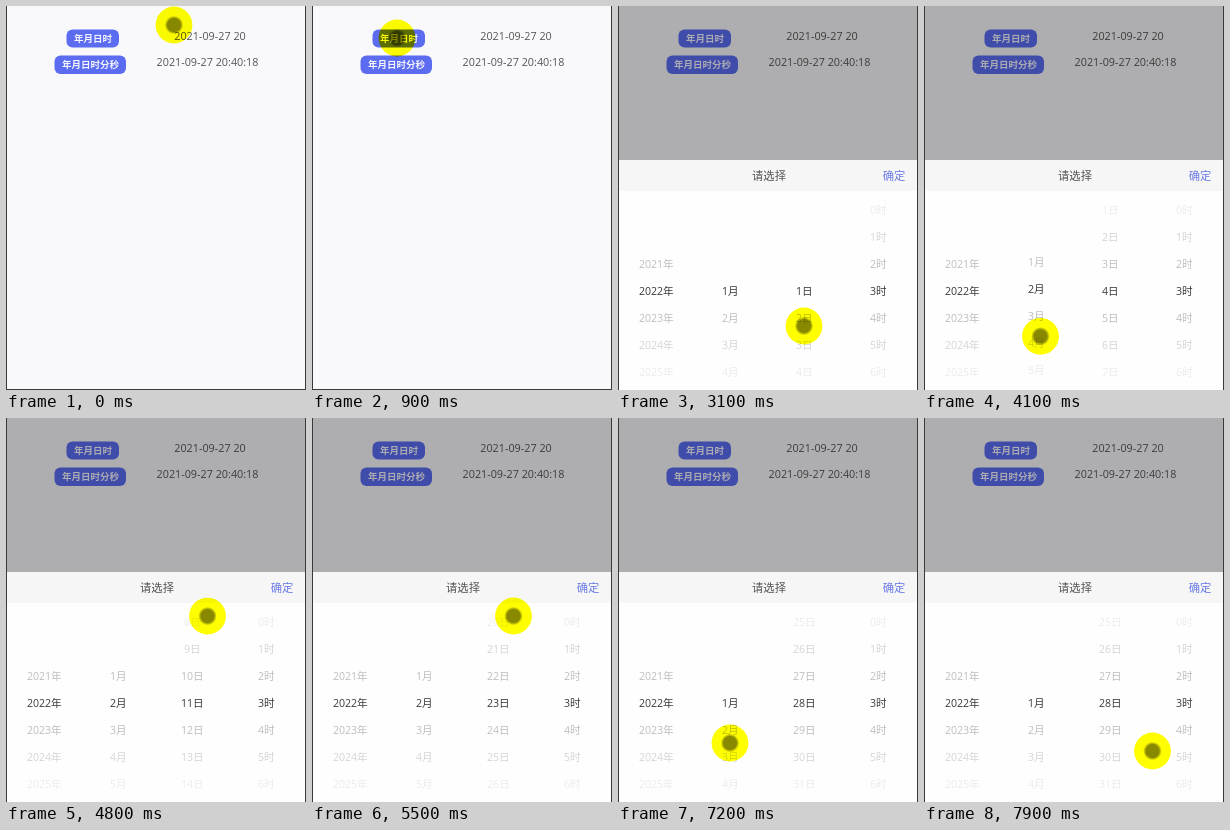
Recreate the animation shown at these times as an HTML page. Size 300 by 384 pixels, loop 8000 ms.

```html
<!DOCTYPE html>
<html lang="zh-CN">
<head>
<meta charset="utf-8">
<style>
html, body { margin: 0; width: 100%; height: 100%; overflow: hidden; background: #f9f9fc; }
svg { display: block; width: 300px; height: 384px; isolation: isolate; }
text { font: 10.8px "Open Sans", "Noto Sans CJK SC", "Noto Sans CJK", sans-serif; text-anchor: middle; fill: #555; }
.button rect { fill: #5b6cf1; }
.button text { font-size: 9.5px; font-weight: 700; fill: #f4f5ff; }
.head text { font-size: 11.3px; fill: #555; }
.head .ok { fill: #6a7ae6; }
.rows text { font-size: 10.6px; fill: #3a3a3a; }
.edge { fill: none; stroke: #3a3a3a; }
#cursor { mix-blend-mode: multiply; }
</style>
</head>
<body>
<svg viewBox="0 0 300 384">
  <defs>
    <radialGradient id="dark">
      <stop offset=".7" stop-color="#8a8a00"/>
      <stop offset="1" stop-color="#ffff00"/>
    </radialGradient>
  </defs>
  <rect width="300" height="384" fill="#f9f9fc"/>
  <g class="button">
    <rect x="60.5" y="23.5" width="52.5" height="18" rx="6"/>
    <text x="87" y="36">年月日时</text>
    <rect x="48.5" y="49.5" width="71.5" height="18.5" rx="6"/>
    <text x="84.5" y="62">年月日时分秒</text>
  </g>
  <text x="204" y="34.3">2021-09-27 20</text>
  <text x="201.5" y="60.3">2021-09-27 20:40:18</text>
  <path class="edge" d="M0 383.5H300"/>
  <rect id="mask" width="300" height="384"/>
  <g id="panel">
    <rect y="154" width="300" height="230" fill="#fefefe"/>
    <g class="rows" id="rows"></g>
    <g class="head">
      <rect y="154" width="300" height="31" fill="#f6f6f7"/>
      <text x="151" y="174">请选择</text>
      <text class="ok" x="276" y="174">确定</text>
    </g>
  </g>
  <path class="edge" d="M.5 0V384M299.5 0V384"/>
  <g id="cursor">
    <circle r="18.4" fill="#ffff00"/>
    <circle id="dot" r="9.3" fill="url(#dark)"/>
  </g>
</svg>
<script>
const LOOP = 8000, ROW = 27, MIDDLE = 288.7, REACH = 4;
const DRAG = 300, TRAVEL = 80; // length of a finger drag in ms and px
const RESET = 2350;            // the other columns restart once the year changes
const $ = id => document.getElementById(id);

// Eased value at time t from [time, value] keys
function track(keys, t) {
  const i = keys.findIndex(k => k[0] > t);
  if (i < 0) return keys[keys.length - 1][1];
  if (i === 0) return keys[0][1];
  const [t0, a] = keys[i - 1], [t1, b] = keys[i];
  const u = (t - t0) / (t1 - t0);
  return a + (b - a) * u * u * (3 - 2 * u);
}

function column(index, unit, now, min, max) {
  const x = 38.3 + 74 * index;
  const cells = Array.from({ length: 2 * REACH + 1 }, () => {
    const cell = document.createElementNS("http://www.w3.org/2000/svg", "text");
    cell.setAttribute("x", x);
    return $("rows").appendChild(cell);
  });
  return { unit, now, min, max, cells, keys: [[0, min]] };
}

const year = column(0, "年", 2021, 2021, 2031);
const month = column(1, "月", 9, 1, 12);
const day = column(2, "日", 27, 1, 31);
const hour = column(3, "时", 20, 0, 23);

const stops = { x: [], y: [] };
function moveTo(t, x, y) {
  stops.x.push([t, x]);
  stops.y.push([t, y]);
}

// Drags a column to a value; the finger lets go at x, y
function drag(col, t, value, x, y) {
  const last = col.keys[col.keys.length - 1][1];
  moveTo(t, x, y + TRAVEL * Math.sign(value - last));
  moveTo(t + DRAG, x, y);
  col.keys.push([t, last], [t + DRAG, value]);
}

moveTo(0, 168, 19);
moveTo(900, 85, 32);
moveTo(1250, 85, 32);
drag(year, 2000, 2022, 41, 195);
drag(hour, 2700, 3, 258, 240);
drag(day, 3100, 4, 186, 240);
drag(month, 3500, 3, 112, 250);
drag(month, 3850, 2, 116.5, 336);
for (let i = 0; i < 3; i++) drag(day, 4500 + 350 * i, 11 + 6 * i, 201.5, 198);
drag(day, 5700, 28.6, 184, 215);
drag(day, 6180, 28, 179.5, 282);
drag(month, 6900, 1, 112, 325);
moveTo(7900, 228.5, 333);

function fade(dy) {
  const d = Math.abs(dy);
  return d < ROW / 2 ? 1 : Math.max(0, 0.44 - d * 0.0043);
}

function drawColumn(col, t) {
  const early = t < RESET;
  const value = early && col !== year ? col.now : track(col.keys, t);
  const min = early ? col.now : col.min;
  const february = !early && Math.round(track(month.keys, t)) === 2;
  const max = col === day ? (early ? 30 : february ? 28 : 31) : col.max;
  col.cells.forEach((cell, i) => {
    const n = Math.round(value) + i - REACH, dy = (n - value) * ROW;
    cell.textContent = n < min || n > max ? "" : n + col.unit;
    cell.setAttribute("y", MIDDLE + dy);
    cell.setAttribute("opacity", fade(dy));
  });
}

function draw(t) {
  const open = track([[1050, 0], [1350, 1]], t);
  $("mask").setAttribute("opacity", 0.3 * open);
  $("panel").setAttribute("transform", `translate(0 ${230 * (1 - open)})`);
  for (const col of [year, month, day, hour]) drawColumn(col, t);
  $("cursor").setAttribute("transform", `translate(${track(stops.x, t)} ${track(stops.y, t)})`);
  $("dot").setAttribute("opacity", t >= 6350 && t < 6500 ? 0 : 1);
}

const begin = performance.now();
function tick() {
  draw((performance.now() - begin) % LOOP);
  requestAnimationFrame(tick);
}
tick();
</script>
</body>
</html>
```
